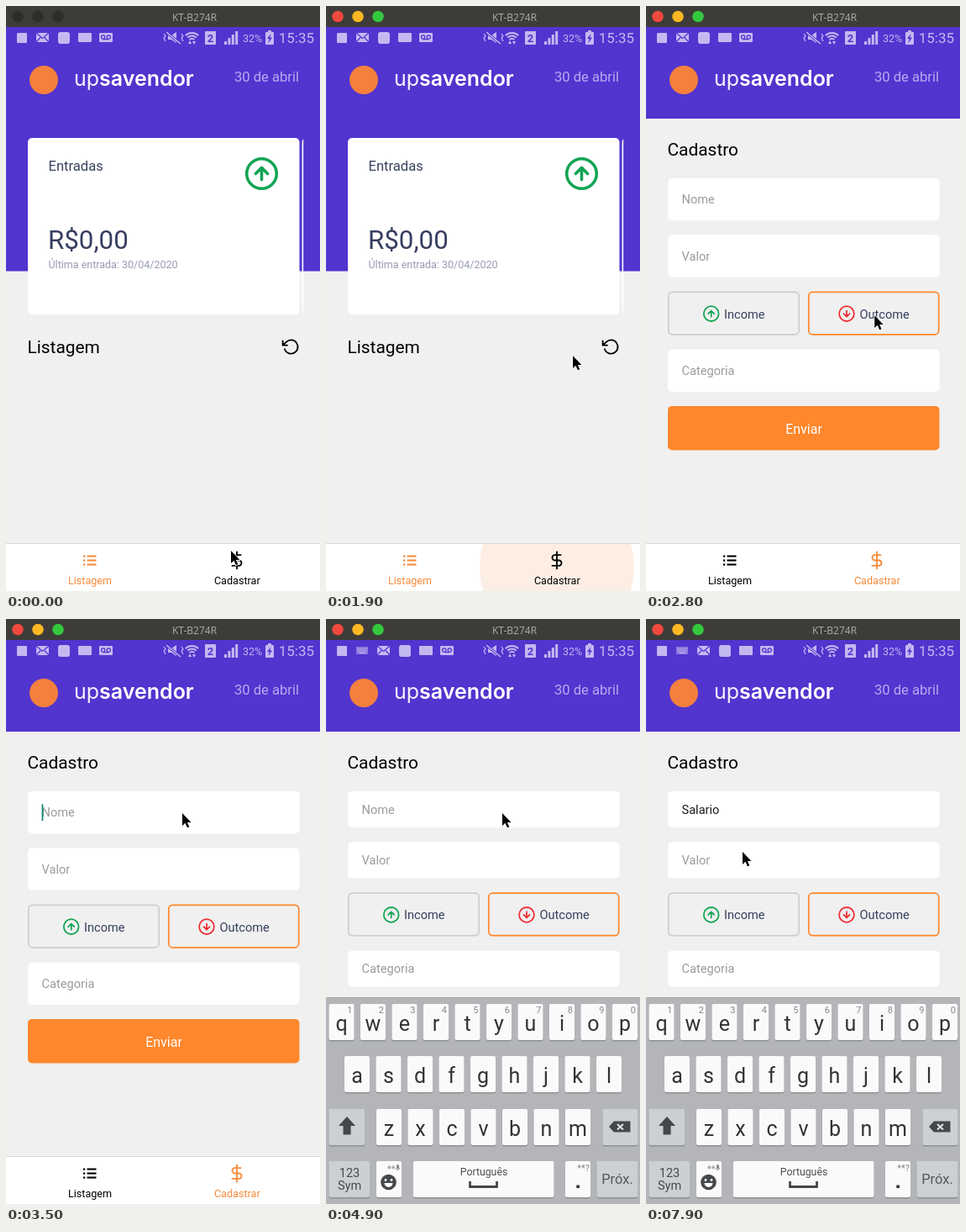
Write an HTML page with a canvas that moves like this. It is 374 px wide and 696 px high and loops after 8000 ms.

```html
<!DOCTYPE html>
<html lang="pt-BR">
<head>
<meta charset="utf-8">
<title>Finanças</title>
<style>
html, body { margin: 0; width: 100%; height: 100%; overflow: hidden; background: #f0f0f0; }
canvas { display: block; width: 374px; height: 696px; }
</style>
</head>
<body>
<canvas id="stage" width="374" height="696"></canvas>
<script>
const ctx = document.getElementById('stage').getContext('2d');
const LOOP = 8000, STEP = 100;
const PURPLE = '#5234cf', ORANGE = '#ff872c', GREEN = '#12a454', RED = '#ee2e33';
const INK = '#363f5f', GRAY = '#f0f0f0', ICON = '#c4b8f1';
const ROBOTO = 'Roboto, sans-serif';

// Line icons on a 24-unit grid
const ICONS = {
  up: new Path2D('M22 12a10 10 0 1 1-20 0a10 10 0 1 1 20 0M16 12l-4-4-4 4M12 16V8'),
  down: new Path2D('M22 12a10 10 0 1 1-20 0a10 10 0 1 1 20 0M8 12l4 4 4-4M12 8v8'),
  reload: new Path2D('M1 4v6h6M3.51 15a9 9 0 1 0 2.13-9.36L1 10'),
  dollar: new Path2D('M12 1v22M17 5H9.5a3.5 3.5 0 0 0 0 7h5a3.5 3.5 0 0 1 0 7H6')
};
const ARROW = new Path2D('M0 0V15L3.4 11.8L5.9 17.3L8.3 16.2L5.9 11H10.4Z');

// Pointer stops: [time, x, y]
const POINTER = [[0, 268, 648], [1400, 268, 648], [1900, 294, 416], [2600, 294, 416],
  [3200, 210, 231], [6600, 210, 231], [7200, 125, 272], [7500, 125, 272], [7800, 115, 277]];
// Caret resets: each entry restarts its blink
const TYPED = 'Salario', TYPE_START = 5100, TYPE_GAP = 200;
const FOCUS = 3400, KEYS_UP = 3800, NAV_OFF = 4000;

const clamp = v => Math.max(0, Math.min(1, v));
const ease = v => v * v * (3 - 2 * v);
const ramp = (t, a, b) => clamp((t - a) / (b - a));

function rect(x, y, w, h, color) {
  ctx.fillStyle = color;
  ctx.fillRect(x, y, w, h);
}
function box(x, y, w, h, r, color) {
  ctx.beginPath();
  ctx.roundRect(x, y, w, h, r);
  ctx.fillStyle = color;
  ctx.fill();
}
function disc(x, y, r, color) {
  ctx.beginPath();
  ctx.arc(x, y, r, 0, 7);
  ctx.fillStyle = color;
  ctx.fill();
}
function line(points, color, width) {
  ctx.beginPath();
  for (let i = 0; i < points.length; i += 2) ctx.lineTo(points[i], points[i + 1]);
  ctx.strokeStyle = color;
  ctx.lineWidth = width;
  ctx.stroke();
}
function poly(points, color) {
  ctx.beginPath();
  for (let i = 0; i < points.length; i += 2) ctx.lineTo(points[i], points[i + 1]);
  ctx.fillStyle = color;
  ctx.fill();
}
function text(s, x, y, size, color, align = 'left', weight = 400, font = ROBOTO) {
  ctx.font = `${weight} ${size}px ${font}`;
  ctx.textAlign = align;
  ctx.fillStyle = color;
  ctx.fillText(s, x, y);
}
function icon(name, cx, cy, scale, color) {
  ctx.save();
  ctx.translate(cx, cy);
  ctx.scale(scale, scale);
  ctx.translate(-12, -12);
  ctx.lineWidth = 2;
  ctx.lineCap = ctx.lineJoin = 'round';
  ctx.strokeStyle = color;
  ctx.stroke(ICONS[name]);
  ctx.restore();
}

function titleBar(active) {
  rect(0, 0, 374, 25, '#3d3c38');
  const colors = active ? ['#f0493f', '#fdb823', '#34c83f'] : ['#2e2d2a', '#2e2d2a', '#2e2d2a'];
  colors.forEach((c, i) => disc(14 + 24 * i, 12.5, 6.8, c));
  text('KT-B274R', 224.5, 18, 12, '#aeada6', 'center', 400, '"Open Sans", sans-serif');
}

function mail(x) {
  rect(x, 32, 15, 11, ICON);
  line([x, 32, x + 7.5, 38.5, x + 15, 32], PURPLE, 1.3);
  line([x, 43, x + 5, 37.5], PURPLE, 1.2);
  line([x + 15, 43, x + 10, 37.5], PURPLE, 1.2);
}
function miniKeys(x) {
  rect(x, 33, 14, 9, '#8f79e2');
  for (let i = 0; i < 10; i++) rect(x + 1.5 + (i % 5) * 2.4, 35 + (i > 4 ? 2.4 : 0), 1.2, 1.2, ICON);
  rect(x + 3.5, 39.6, 7, 1.2, ICON);
}
function voicemail(x) {
  box(x, 32, 16, 11, 1, ICON);
  for (const dx of [4.7, 11.3]) {
    ctx.beginPath();
    ctx.arc(x + dx, 37, 2.2, 0, 7);
    ctx.strokeStyle = PURPLE;
    ctx.lineWidth = 1.2;
    ctx.stroke();
  }
  line([x + 4.7, 39.6, x + 11.3, 39.6], PURPLE, 1.2);
}

function statusBar(keys) {
  const shift = keys ? 25 : 0;
  box(13, 32, 12, 12, 1, ICON);
  if (keys) miniKeys(36);
  mail(36 + shift);
  box(62 + shift, 31, 14, 14, 3, ICON);
  box(86 + shift, 32, 16, 11, 1, ICON);
  voicemail(111 + shift);

  line([188, 33, 190, 36, 188, 38, 190, 42], ICON, 1.2);
  line([209, 33, 211, 36, 209, 38, 211, 42], ICON, 1.2);
  poly([193, 35, 197, 35, 203, 31, 203, 44, 197, 40, 193, 40], ICON);
  line([191, 31, 208, 45], PURPLE, 3);
  line([191, 31, 208, 45], ICON, 1.4);
  for (const r of [4, 7.5, 11]) {
    ctx.beginPath();
    ctx.arc(221.5, 43, r, -2.35, -0.79);
    ctx.strokeStyle = ICON;
    ctx.lineWidth = 1.8;
    ctx.stroke();
  }
  poly([219, 41, 217, 45, 221, 45], ICON);
  poly([224, 46, 222, 42, 226, 42], ICON);
  box(237, 30, 13, 16, 1, ICON);
  text('2', 243.5, 43, 13, PURPLE, 'center', 700);
  for (let i = 0; i < 4; i++) rect(260 + i * 4.4, 42 - i * 4, 3, 4 + i * 4, ICON);
  text('32%', 282, 42.5, 12.5, ICON);
  rect(312, 29, 4, 2, ICON);
  box(309, 31, 10, 15, 1, ICON);
  poly([315.5, 33, 311, 39, 313.6, 39, 312.5, 44, 317, 37.6, 314.4, 37.6], PURPLE);
  text('15:35', 367, 44, 17, ICON, 'right');
}

function header(bottom, keys) {
  rect(0, 25, 374, bottom - 25, PURPLE);
  statusBar(keys);
  disc(45, 88, 17, '#f5803e');
  const font = 'Inter, sans-serif';
  text('up', 81, 95, 25, '#f6f3ff', 'left', 400, font);
  const x = 81 + ctx.measureText('up').width;
  text('savendor', x, 95, 25, '#fff', 'left', 600, font);
  text('30 de abril', 349, 89.5, 16.6, '#b9a9ee', 'right');
}

function home() {
  header(315.5, false);
  box(26, 157, 323.5, 210, 5, '#fff');
  ctx.save();
  ctx.beginPath();
  ctx.rect(350, 150, 4.2, 230);
  ctx.clip();
  box(352.6, 157, 300, 210, 5, '#fff');
  ctx.restore();
  text('Entradas', 50.5, 196, 16.6, INK);
  icon('up', 304.5, 199.5, 1.78, GREEN);
  text('R$0,00', 50, 289, 31.3, INK);
  text('Última entrada: 30/04/2020', 50.5, 312, 12.5, '#969cb3');
  text('Listagem', 25.5, 413, 20.9, '#000');
  icon('reload', 339.5, 405.5, 0.9, '#000');
}

function field(y, h, hint, value) {
  box(26, y, 323.5, h, 5, '#fff');
  if (h < 30) return;
  const base = y + h / 2 + 5.3;
  text(value || hint, 42.5, base, 14.6, value ? '#1d1d1d' : '#9b9b9b');
}
function choice(x, w, y, name, label, tint, border) {
  ctx.beginPath();
  ctx.roundRect(x + 0.8, y + 0.8, w - 1.6, 50.4, 4.5);
  ctx.strokeStyle = border;
  ctx.lineWidth = 1.7;
  ctx.stroke();
  icon(name, x + 51.7 - (x > 100 ? 5.7 : 0), y + 26.5, 0.89, tint);
  text(label, x > 100 ? 254.5 : 93, y + 32, 14.6, INK);
}

function form(t) {
  const keys = t >= KEYS_UP;
  // The fields shrink to share whatever height is left
  const h = !keys ? 50.3 : t < NAV_OFF ? 21.6 : 43.2;
  header(134, keys);
  text('Cadastro', 25.5, 178, 20.9, '#000');
  const typed = t < TYPE_START ? '' : TYPED.slice(0, Math.floor((t - TYPE_START) / TYPE_GAP) + 1);
  let y = 205;
  field(y, h, 'Nome', typed);
  if (caretOn(t) && h > 30) {
    ctx.font = `400 14.6px ${ROBOTO}`;
    rect(42.6 + ctx.measureText(typed).width, y + h / 2 - 10, 1.7, 20, '#12877a');
  }
  y += h + 17;
  field(y, h, 'Valor');
  y += h + 17;
  choice(26, 157, y, 'up', 'Income', GREEN, '#cdcdcd');
  choice(193, 156.5, y, 'down', 'Outcome', RED, ORANGE);
  y += 52 + 17;
  field(y, h, 'Categoria');
  y += h + 17;
  box(26, y, 323.5, 52.5, 5, ORANGE);
  text('Enviar', 188, y + 33, 16, '#fff', 'center');
}

function caretOn(t) {
  if (t < FOCUS) return false;
  const last = TYPE_START + TYPE_GAP * (TYPED.length - 1);
  const from = t < TYPE_START ? FOCUS : t < last ? t : last;
  return (t - from) % 1000 < 500;
}

function navBar(y, onForm, t) {
  rect(0, y, 374, 57, '#fff');
  rect(0, y - 0.5, 374, 1, '#d8d8d8');
  if (t >= 1200 && t < 2400) {
    ctx.save();
    ctx.beginPath();
    ctx.rect(0, y + 0.5, 374, 57);
    ctx.clip();
    ctx.globalAlpha = 1 - ramp(t, 2000, 2400);
    disc(275, y + 28, 20 + 72 * ease(ramp(t, 1200, 1600)), '#fdeee4');
    ctx.restore();
  }
  const left = onForm ? '#000' : '#f58a3c', right = onForm ? '#f58a3c' : '#000';
  for (let i = 0; i < 3; i++) {
    rect(92, y + 14 + i * 5, 2.2, 2.2, left);
    rect(96.5, y + 14 + i * 5, 11, 2.1, left);
  }
  text('Listagem', 100, y + 48, 12.6, left, 'center');
  icon('dollar', 275, y + 20, 0.92, right);
  text('Cadastrar', 275.3, y + 48, 12.6, right, 'center');
}

function key(x, y, w, label, special) {
  box(x, y + 1.5, w, 43, 2, '#8e9194');
  box(x, y, w, 43, 2, special ? '#cdd0d3' : '#fafafa');
  if (label) text(label, x + w / 2, y + 32, 25, '#333', 'center');
}

function keyboard() {
  const dark = '#45484b', dim = '#85888b';
  rect(0, 450, 374, 246, '#b3b5b8');
  rect(0, 450, 374, 1, '#a4a6a9');
  const row = (s, x, y) => [...s].forEach((c, i) => key(x + i * 37.5, y, 30, c));
  row('qwertyuiop', 3.5, 458);
  [...'1234567890'].forEach((c, i) => text(c, 31.5 + i * 37.5, 469, 11, dim, 'right'));
  row('asdfghjkl', 22, 520);
  row('zxcvbnm', 60, 583);
  key(3.5, 583, 42.5, '', true);
  poly([25, 592, 35, 603, 29.5, 603, 29.5, 613.5, 20.5, 613.5, 20.5, 603, 15, 603], dark);
  key(329.5, 583, 42, '', true);
  poly([337, 604, 343, 597.5, 362.5, 597.5, 362.5, 610.5, 343, 610.5], dark);
  line([347, 601, 354, 607.5], '#dfe1e3', 2);
  line([354, 601, 347, 607.5], '#dfe1e3', 2);

  key(3.5, 645, 48.5, '', true);
  text('123', 28, 664, 14.5, dark, 'center');
  text('Sym', 28, 679, 14.5, dark, 'center');
  key(60, 645, 30);
  text('**', 73, 658, 11, dim);
  box(84, 649, 3, 5, 1.5, dim);
  line([83, 653, 85.5, 656, 88, 653], dim, 1);
  disc(74.5, 670, 9.3, dark);
  disc(71, 667.5, 1.4, '#fff');
  disc(78, 667.5, 1.4, '#fff');
  ctx.beginPath();
  ctx.arc(74.5, 671, 5, 0, Math.PI);
  ctx.fillStyle = '#fff';
  ctx.fill();
  key(104, 645, 167.5);
  text('Português', 188, 662, 12.3, '#4b4d50', 'center');
  line([171.5, 669, 171.5, 675.5, 203.5, 675.5, 203.5, 669], dark, 2.8);
  key(285, 645, 30);
  text('**?', 314, 657, 11, dim, 'right');
  rect(298.3, 673.5, 3.6, 3.6, '#333');
  key(322.5, 645, 49, '', true);
  text('Próx.', 347, 672, 16.5, '#55585b', 'center');
}

function pointer(t) {
  const i = POINTER.findLastIndex(p => p[0] <= t);
  const a = POINTER[i], b = POINTER[i + 1] || a;
  const k = a === b ? 0 : ease(ramp(t, a[0], b[0]));
  ctx.save();
  ctx.translate(a[1] + (b[1] - a[1]) * k, a[2] + (b[2] - a[2]) * k);
  ctx.lineJoin = 'round';
  ctx.lineWidth = 1.8;
  ctx.strokeStyle = '#fff';
  ctx.stroke(ARROW);
  ctx.fillStyle = '#000';
  ctx.fill(ARROW);
  ctx.restore();
}

function draw(t) {
  const onForm = t >= 2000, keys = t >= KEYS_UP;
  rect(0, 0, 374, 696, GRAY);
  if (onForm) form(t); else home();
  titleBar(t >= 1100);
  const navY = keys ? 393.5 + 57 * ramp(t, NAV_OFF - 100, NAV_OFF + 200) * (t >= NAV_OFF) : 639.5;
  if (t < NAV_OFF + 200) navBar(navY, onForm, t);
  if (keys) keyboard();
  pointer(t);
}

const start = performance.now();
function tick() {
  const t = (performance.now() - start) % LOOP;
  draw(Math.floor(t / STEP) * STEP);
  requestAnimationFrame(tick);
}
tick();
</script>
</body>
</html>
```
